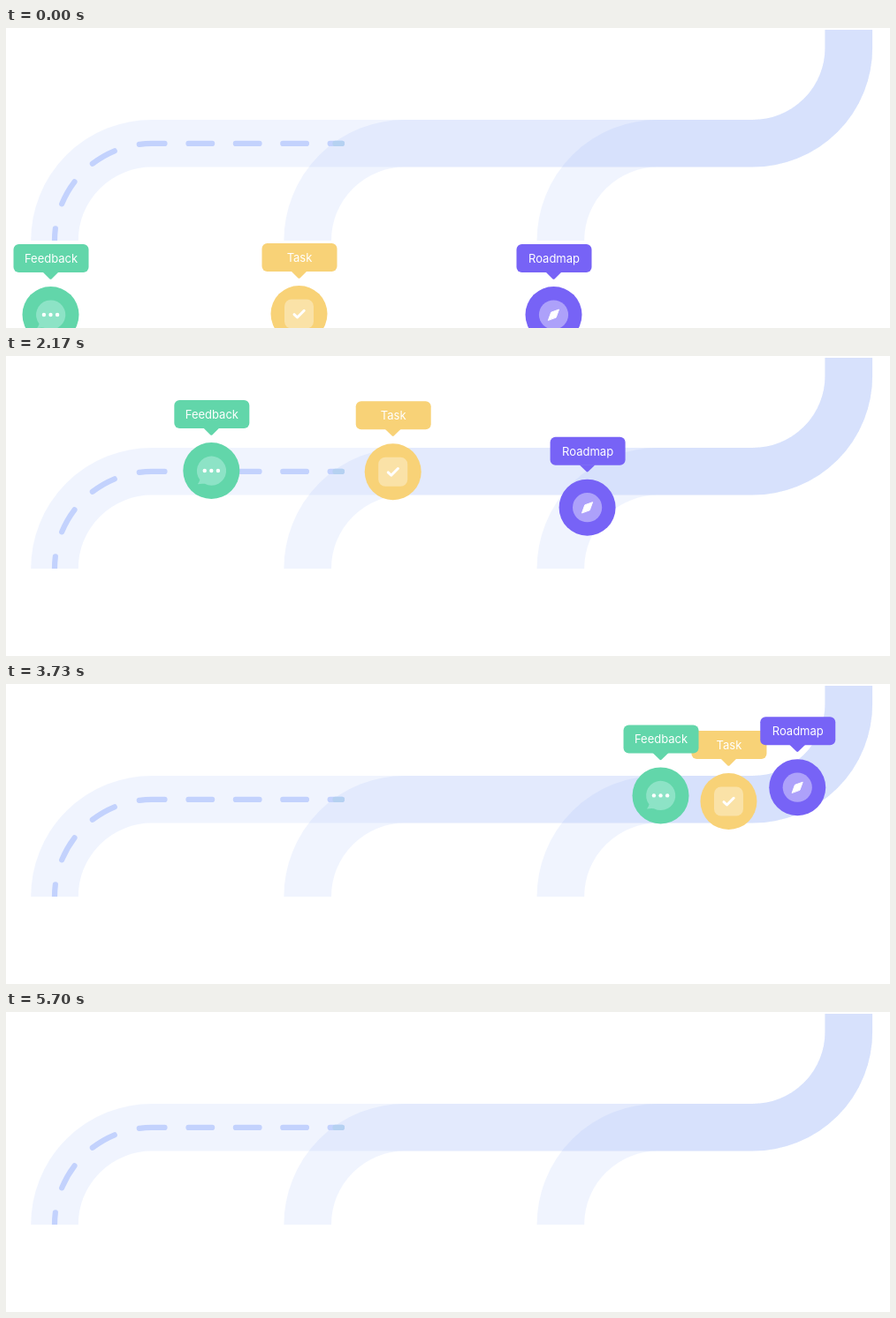
An HTML page for the animation above (6030 ms loop, 1000 by 340 pixels).

```html
<!DOCTYPE html>
<html lang="en">
<head>
<meta charset="utf-8">
<title>Roads</title>
<style>
  html, body { margin: 0; height: 100%; overflow: hidden; background: #fff; }
  svg { display: block; }
  .road { fill: none; stroke: #6b96f0; stroke-opacity: .1; stroke-width: 53.6; }
  .dash { fill: none; stroke: #c3d2fd; stroke-width: 6.2; stroke-linecap: round; }
  .route { fill: none; }
  text { font: 13px Inter, sans-serif; fill: #fff; text-anchor: middle; }
  .mark { fill: #fff; stroke: #fff; stroke-linecap: round; stroke-linejoin: round; }
</style>
</head>
<body>
<svg id="stage" width="1000" height="340" viewBox="0 0 1000 340">
  <g id="roads"></g>
  <svg width="1000" height="241">
    <path class="dash" stroke-dasharray="28.9" d="M179.5 130.9H165A110 110 0 0 0 55 240.9V244"/>
    <path class="dash" stroke-dasharray="26.7" stroke-dashoffset="13.35" d="M380 130.9H200"/>
    <path class="dash" style="stroke:#b5d1f1" d="M372.5 130.9H380"/>
  </svg>
  <g id="pins"></g>
</svg>
<script>
const LOOP = 6030, TRAVEL = 6000;
const $ = id => document.getElementById(id);

$('roads').innerHTML = [55, 341.2, 627.4].map(x => `<path class="road"
  d="M${x} 241v-.25a110 110 0 0 1 110-110H845A108.3 108.3 0 0 0 953.3 22.45V2"/>`).join('');

// Listed from back to front
const pins = [
  {
    name: 'Task', color: '#f8d277',
    icon: `<rect x="-16.5" y="-16.5" width="33" height="33" rx="8" fill="#fae2a7"/>
      <path class="mark" style="fill:none" stroke-width="3" d="M-5.5 .7L-2 4L5.7-3.7"/>`,
    route: 'M331.5 324L333.5 295C338 210 366 128 460 130L579 130L722 133H835C908 133 942 105 952 40Q955 10 955-38'
  },
  {
    name: 'Feedback', color: '#62d6aa',
    icon: `<path fill="#8de3c6" d="M-13 10.2A16.6 16.6 0 1 1-7.5 14.8Q-11 14.2-15.5 15.2Q-13.7 13-13 10.2Z"/>
      <g fill="#fff"><circle cx="-7.6" r="2.2"/><circle r="2.2"/><circle cx="7.6" r="2.2"/></g>`,
    route: 'M50.5 325L49.4 286.5C46.5 180 97 131 190 130.4L423 128.5L615 127.4L840 125.6C912 125 950 108 954 6L955.5-54'
  },
  {
    name: 'Roadmap', color: '#7763f6',
    icon: `<circle r="16.6" fill="#ada1fa"/>
      <path class="mark" stroke-width="1" d="M-6 6L-2.8-2.8L6-6L2.8 2.8Z"/>`,
    route: 'M619.5 325C621 295 624 265 628 242C638 186 672 131 745 130L840 130.5C890 130 940 100 949.5 45C952 30 956 0 956.5-36'
  }
];

$('pins').innerHTML = pins.map(p => `<path class="route" d="${p.route}"/>
  <g><g fill="${p.color}">
    <circle r="32"/>
    <rect x="-42" y="-80" width="85" height="32" rx="6"/>
    <path d="M-9-48.5H9L1-40.6Q0-39.8-1-40.6Z"/>
  </g>${p.icon}<text x=".5" y="-59">${p.name}</text></g>`).join('');

const movers = [...document.querySelectorAll('.route')].map(route => ({
  route, pin: route.nextElementSibling, length: route.getTotalLength()
}));

// Cubic ease-in-out with handles at .42 and .58
function ease(x) {
  let lo = 0, hi = 1;
  for (let i = 0; i < 24; i++) {
    const u = (lo + hi) / 2;
    if (1.26 * u - .78 * u * u + .52 * u ** 3 < x) lo = u; else hi = u;
  }
  return lo * lo * (3 - 2 * lo);
}

function draw(now) {
  const share = ease(Math.min(now % LOOP / TRAVEL, 1));
  for (const { route, pin, length } of movers) {
    const { x, y } = route.getPointAtLength(share * length);
    pin.setAttribute('transform', `translate(${x} ${y})`);
  }
  requestAnimationFrame(draw);
}
draw(0);
</script>
</body>
</html>
```
